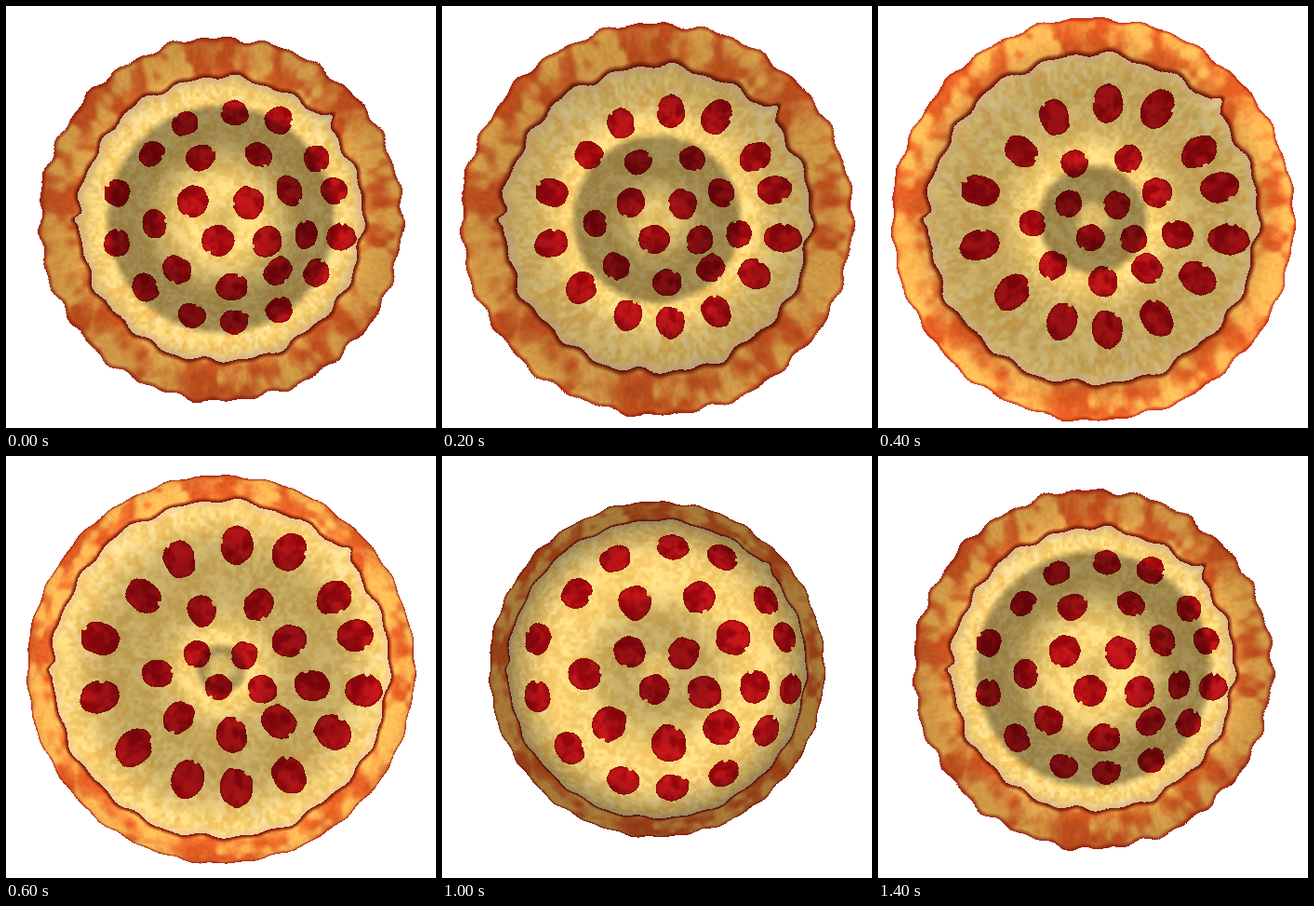
Write an HTML page with a canvas that moves like this. It is 462x453 px and loops after 1500 ms.

```html
<!DOCTYPE html>
<html lang="en">
<head>
<meta charset="utf-8">
<title>Rippling pizza</title>
<style>
html, body { margin: 0; width: 100%; height: 100%; overflow: hidden; background: #fff; }
canvas { display: block; }
</style>
</head>
<body>
<canvas id="stage" width="462" height="453"></canvas>
<script>
const W = 462, H = 453, CX = 230.5, CY = 228.5;
const SCALE = 2, STEP = 100, STEPS = 15, TAU = Math.PI * 2;
const ctx = document.getElementById('stage').getContext('2d');

// Slice centres as they lie at 800 ms
const SLICES = [
  184,106, 248,92, 305,101, 143,146, 208,161, 274,154, 354,151, 97,194, 204,212,
  256,213, 309,196, 376,192, 157,233, 228,248, 96,259, 277,252, 335,247, 384,251,
  182,284, 297,289, 133,316, 242,304, 354,298, 193,351, 306,345, 248,360
];

const clamp = v => Math.max(0, Math.min(1, v));
const smooth = (a, b, v) => { const k = clamp((v - a) / (b - a)); return k * k * (3 - 2 * k); };
const lerp = (a, b, k) => a + (b - a) * k;
const mix = (a, b, k) => a.map((v, i) => lerp(v, b[i], k));

function hash(x, y) {
  const n = Math.sin(x * 127.1 + y * 311.7) * 43758.5453;
  return n - Math.floor(n);
}

function noise(x, y) {
  const i = Math.floor(x), j = Math.floor(y), u = smooth(0, 1, x - i), v = smooth(0, 1, y - j);
  return lerp(lerp(hash(i, j), hash(i + 1, j), u), lerp(hash(i, j + 1), hash(i + 1, j + 1), u), v);
}

// Ripple running inward: phase and displaced radius of a point at rest radius r
const phase = (r, t) => 0.0044 * t + 0.0249 * r - 0.32;
const displaced = (r, t) => r * (1 + 0.096 * Math.cos(phase(r, t)));

// Bright crest edge, dim slope, bright top, dark back, then a sharp step to the next crest
function light(r, t) {
  const JUMP = 2.85;
  let p = phase(r, t);
  p -= TAU * Math.floor((p - JUMP + TAU) / TAU);
  let b = 1.05 - 0.39 * smooth(0.3, 2.1, p);
  if (p < 0) {
    const front = 0.81 + 0.24 * Math.exp(-(((p + 3.05) / 0.65) ** 2)) + 0.24 * smooth(-1.2, 0, p);
    b = lerp(0.66, front, smooth(JUMP - TAU, JUMP - TAU + 0.35, p));
  }
  return lerp(b, 0.95, smooth(28, 5, r));
}

function restPoint(x, y, t) {
  const dx = x - CX, dy = y - CY, d = Math.hypot(dx, dy);
  let r = 0;
  while (displaced(r, t) < d) r += 0.1;
  return { x: dx * r / d, y: dy * r / d };
}

const slices = [];
for (let i = 0; i < SLICES.length; i += 2) {
  const s = restPoint(SLICES[i], SLICES[i + 1], 800);
  const a = hash(i, 5) * TAU;
  s.size = 15.8 + hash(i, 9) * 1.8;
  s.nx = s.x + Math.cos(a) * s.size;
  s.ny = s.y + Math.sin(a) * s.size;
  slices.push(s);
}

function sliceColor(x, y) {
  for (const s of slices) {
    const dx = x - s.x, dy = y - s.y;
    if (dx * dx + dy * dy > 420) continue;
    const depth = s.size + (noise(x / 8, y / 8) - 0.5) * 2.4 - Math.hypot(dx, dy);
    if (depth < 0 || Math.hypot(x - s.nx, y - s.ny) < 2.6) continue;
    const n = noise(x / 9 + 40, y / 9) * 0.65 + noise(x / 4, y / 4 + 70) * 0.35;
    const c = mix([148, 6, 13], [190, 22, 25], smooth(0.25, 0.75, n));
    return mix([140, 14, 12], c, smooth(0, 3, depth));
  }
}

function cheeseColor(x, y, r, a, edge) {
  const n = noise(x / 9, y / 9) * 0.5 + noise(x / 3.5, y / 3.5) * 0.5;
  let c = mix([230, 190, 98], [250, 219, 132], smooth(0.2, 0.8, n));
  c = mix(c, [234, 172, 74], 0.45 * smooth(0.6, 0.85, noise(x / 7 + 90, y / 7)) * smooth(60, 140, r));
  const streak = noise(a * 24 + 200, r / 9) * 0.6 + noise(x / 4, y / 4 + 33) * 0.4;
  c = mix(c, [246, 226, 180], 0.5 * smooth(0.55, 0.8, streak) * smooth(105, 150, r));
  return mix(c, [226, 190, 148], 0.65 * smooth(9, 1, edge - r));
}

function crustColor(x, y, r, a, inner, outer) {
  const n = noise(x / 22 + 11, y / 22) * 0.55 + noise(x / 9, y / 9 + 50) * 0.45;
  let c = mix([222, 92, 34], [252, 184, 84], smooth(0.2, 0.7, n - 0.15 * Math.cos(8 * a)));
  c = c.map(v => v * lerp(0.95, 1.06, noise(x / 3, y / 3)));
  c = mix([124, 24, 10], c, smooth(0, 5.5, r - inner));
  return mix([170, 26, 18], c, 0.25 + 0.75 * smooth(0, 4, outer - r));
}

function pizzaColor(x, y) {
  const r = Math.hypot(x, y);
  if (r > 208) return;
  const a = Math.atan2(y, x);
  const outer = 197.3 + 1.1 * Math.sin(23 * a) + 1.1 * Math.sin(37 * a + 1) + 0.7 * Math.sin(11 * a + 2);
  if (r > outer) return;
  const spike = (at, size) => size * Math.exp(-(((Math.abs(a) > 3 ? Math.abs(a) : a) - at) ** 2) / 0.0012);
  const inner = 164.8 + 1.6 * Math.sin(17 * a + 1) + 1.3 * Math.sin(29 * a) + 1.1 * Math.sin(9 * a + 3)
    + spike(Math.PI, 6) + spike(-0.75, 8);
  if (r > inner) return crustColor(x, y, r, a, inner, outer);
  return sliceColor(x, y) || cheeseColor(x, y, r, a, inner);
}

const TW = W * SCALE, TH = H * SCALE;
const texture = new Uint8ClampedArray(TW * TH * 4);
for (let y = 0, o = 0; y < TH; y++) {
  for (let x = 0; x < TW; x++, o += 4) {
    const c = pizzaColor(x / SCALE - CX, y / SCALE - CY);
    if (c) texture.set([c[0], c[1], c[2], 255], o);
  }
}

const image = ctx.createImageData(W, H);

function draw(t) {
  const ratio = new Float32Array(1400), shade = new Float32Array(1400);
  for (let r = 0.1; r < 208; r += 0.1) {
    const d = displaced(r, t), i = Math.floor(d * 4);
    ratio[i] = r / d;
    shade[i] = light(r, t);
  }
  image.data.fill(0);
  for (let y = 0, o = 0; y < H; y++) {
    for (let x = 0; x < W; x++, o += 4) {
      const dx = x - CX, dy = y - CY, i = Math.floor(Math.sqrt(dx * dx + dy * dy) * 4);
      const k = ratio[i], b = shade[i];
      if (!k) continue;
      const s = (Math.round((CY + dy * k) * SCALE) * TW + Math.round((CX + dx * k) * SCALE)) * 4;
      for (let c = 0; c < 3; c++) image.data[o + c] = texture[s + c] * b;
      image.data[o + 3] = texture[s + 3];
    }
  }
  ctx.putImageData(image, 0, 0);
}

let shown = 0;
draw(0);
const start = performance.now();
function tick() {
  const step = Math.floor((performance.now() - start) / STEP) % STEPS;
  if (step !== shown) draw((shown = step) * STEP);
  requestAnimationFrame(tick);
}
requestAnimationFrame(tick);
</script>
</body>
</html>
```
